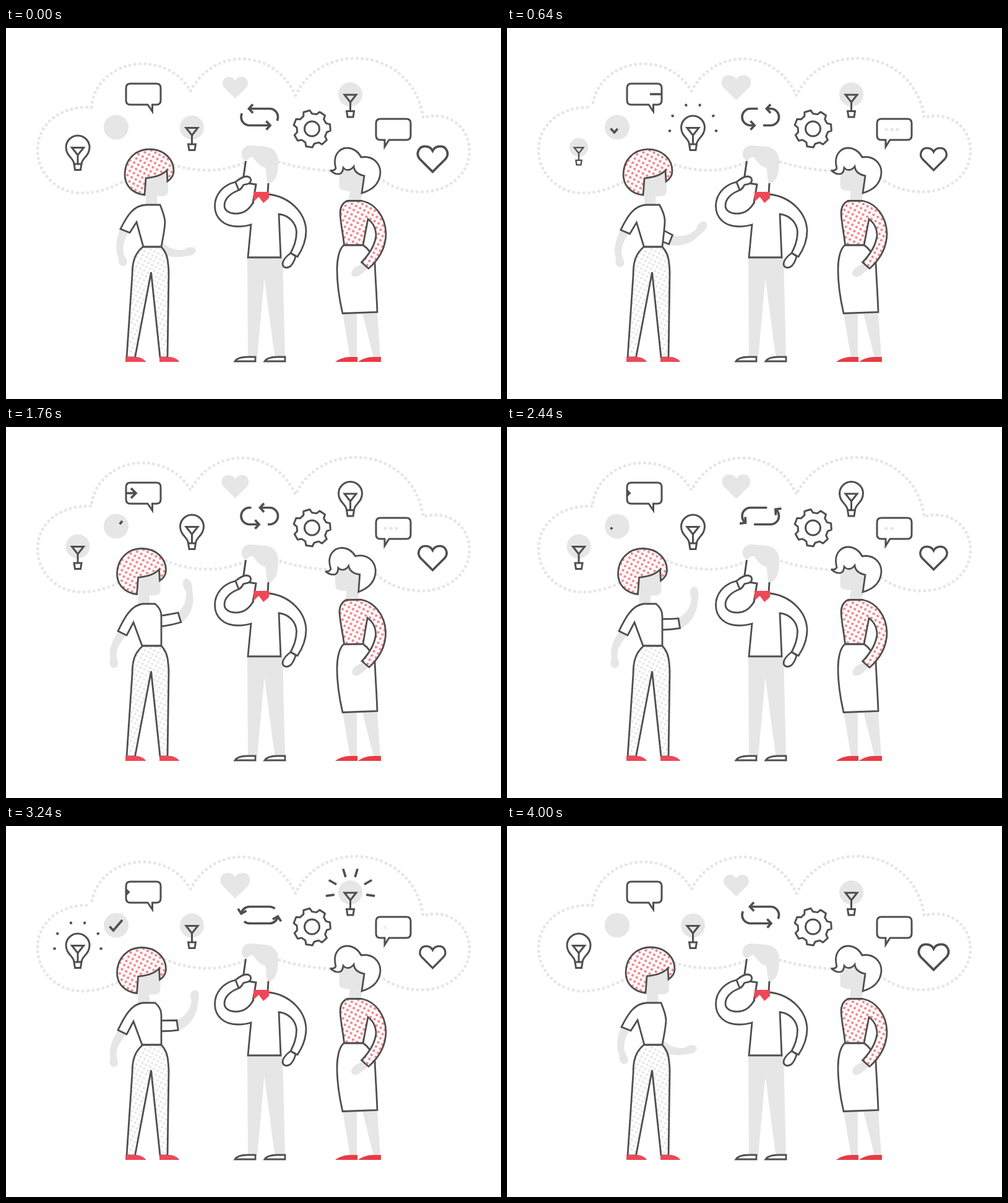
Animation, 800 px wide and 600 px high, one loop 4040 ms. Source, as an HTML page:

```html
<!DOCTYPE html>
<html lang="en">
<head>
<meta charset="utf-8">
<title>Three people sharing ideas</title>
<style>
  html, body { margin: 0; width: 100%; height: 100%; overflow: hidden; background: #fff; }
  svg { display: block; width: 800px; height: 600px; }
  .line { fill: none; stroke: #4f4f4f; stroke-width: 3; }
  .bold { stroke-width: 3.7; }
  .shape { fill: #fff; stroke: #4f4f4f; stroke-width: 2.8; }
  .soft { fill: #e6e6e6; }
  .red { fill: #ee4857; }
</style>
</head>
<body>
<svg viewBox="0 0 800 600">
  <defs>
    <pattern id="redDots" width="7.6" height="7.6" patternUnits="userSpaceOnUse" patternTransform="rotate(28)">
      <rect width="8" height="8" fill="#fff"/><circle cx="3.8" cy="3.8" r="2.2" fill="#f7868b"/>
    </pattern>
    <pattern id="softDots" width="7" height="7" patternUnits="userSpaceOnUse" patternTransform="rotate(28)">
      <rect width="8" height="8" fill="#fff"/><circle cx="3.5" cy="3.5" r="2.1" fill="#e6e6e6"/>
    </pattern>
    <clipPath id="inBubble"><rect x="194" y="90" width="57" height="34" rx="7"/></clipPath>
  </defs>

  <path id="cloud" fill="none" stroke="#e6e6e6" stroke-width="5" stroke-linecap="round" stroke-dasharray="0 8.2"
    d="M138,128C142,85 180,58 220,58C255,58 283,75 298,102C315,70 345,50 381,50C420,50 452,74 468,109C485,72 522,49 565,49C625,49 668,92 674,145C715,133 749,160 749,199C749,237 714,265 672,265C645,265 622,257 604,243L585,224C565,231 545,232 525,231C495,229 468,225 444,217L382,219C362,227 345,230 327,230C300,230 272,224 250,212C235,228 215,240 190,248C168,260 145,267 122,267C83,267 51,236 51,197C51,158 84,126 138,128"/>

  <g id="icons">
    <path class="line" d="M201,90H243q7,0 7,7V117q0,7 -7,7H236.500V135L229,124H201q-7,0 -7,-7V97q0,-7 7,-7Z"/>
    <g clip-path="url(#inBubble)"><path id="arrow" class="line bold" d="M-27,0H0M-8,-8L0,0L-8,8"/></g>

    <circle class="soft" cx="178" cy="160.500" r="20"/>
    <path id="check" class="line bold" pathLength="100" d="M167.500,162.500L173.500,169L188,152"/>

    <path id="softHeart" class="soft"/>
    <path id="lineHeart" class="line bold"/>

    <path id="loop" class="line bold" pathLength="150" stroke-dasharray="61 14"
      d="M393.500,130.500A13.500,13.500 0 0 0 393.500,157.500H426A13.500,13.500 0 0 0 426,130.500Z"/>
    <path class="line bold head" d="M-6.500,-7L0,0L-6.500,7"/>
    <path class="line bold head" d="M-6.500,-7L0,0L-6.500,7"/>

    <path id="gear" class="line" stroke-linejoin="round"/>
    <circle class="line" cx="494.500" cy="163" r="12"/>

    <path class="line" d="M605,147H647q7,0 7,7V174q0,7 -7,7H619L612,192V181H605q-7,0 -7,-7V154q0,-7 7,-7Z"/>
    <g id="typing" class="soft">
      <circle cx="613" cy="164" r="2.600"/><circle cx="622" cy="164" r="2.600"/><circle cx="631" cy="164" r="2.600"/>
    </g>
  </g>

  <g id="woman1">
    <g id="head1">
      <path class="soft" d="M226,243C240,241 252,239 260,229L262,250V262Q262,272 252,272H244L245,288H226Z"/>
      <path class="shape" style="fill:url(#redDots)" d="M224,270C205,268 192,255 192,237C192,212 210,196 232,196C255,196 271,212 271,231C271,238 267,244 261,248L260,230C250,240 238,241 226,243Z"/>
    </g>
    <path id="backArm" class="soft" d="M184,326C177,345 176,360 182,371C180,380 185,385 190,385C196,384 198,377 193,371C187,360 188,348 199,328Z"/>
    <path id="foreArm" class="soft" d="M-1,-8C14,-12 24,-22 27.500,-36C25,-45 29,-53 35,-53C42,-51 42,-42 37.500,-32C33,-12 20,5 -1,9Z"/>
    <path id="sleeve" class="shape" d="M-45,-14Q-20,-10 0,-8V8Q-20,8 -45,3Z"/>
    <path id="torso1" class="shape"/>
    <path class="shape" style="fill:url(#softDots)" d="M221,354C208,365 204,378 204,400L195,533H208.500L234.500,395L249,533H261L263,395C262,375 261,365 251,354Z"/>
    <path class="red" d="M193,532H212C219,533 225,537 226,540H193ZM248,532H266C273,533 279,537 280,540H248Z"/>
  </g>

  <g id="man">
    <path fill="#fff" d="M388,210L382,266H424V212Z"/>
    <path class="soft" d="M381,207C379,195 388,189 397,190L420,192C434,194 440,204 440,215C440,236 436,250 423,252C420,242 421,234 419,226C408,224 402,212 399,209C394,207 390,214 387,214C384,213 382,210 381,207Z"/>
    <path class="soft" d="M390,371H447L451,533H434.500L417.500,405L406,533H391Z"/>
    <path class="line" d="M387.500,215L383.500,243M424,251L423,267"/>
    <path class="shape" d="M371,249C350,254 337.500,270 337.500,288C337.500,308 353,321 374,321C382,321 390,320 396,318L391,371H444L441,301C458,303 469,316 469.500,330C469.500,344 465,354 460,364L471,370C479,358 485,345 485,328C484,298 458,273 425,269L402,268L399,283C393,293 386,299 375,300C362,301 353,296 353,287C353,276 363,267 377,262Z"/>
    <path class="line" d="M391,251L404,253L399,284"/>
    <path class="shape" d="M371,249C377,244 383,240 389,240C397,241 398,249 391,252C387,254 384,252 383,255C381,259 379,261 376,262Z"/>
    <path class="shape" d="M460,364C452,370 447,376 447,382C448,389 456,389 461,384C465,379 467,374 468,369Z"/>
    <path class="red" d="M400,265H425V275L416,283L408.500,273L400,281Z"/>
    <path class="shape" d="M370,539C374,533 383,532 390,532H403V539ZM418,539C422,533 431,532 438,532H451V539Z"/>
  </g>

  <g id="woman2">
    <path class="soft" d="M544,461H567V533H556ZM576,461H600L605,533H594Z"/>
    <path class="red" style="fill:#e93b43" d="M532,540C538,535 548,532 556,532H568V540ZM569,540C575,535 585,532 593,532H606V540Z"/>
    <path class="shape" d="M546,351C538,358 535,375 535,390C535,415 539,440 544,461.500L600,459.500C599,430 597,405 596,378C592,367 586,357 577,351Z"/>
    <g id="head2">
      <path class="soft" d="M541,231L538.500,240V256C539,262 546,263 556,264L553,280H573L577,262L580,236C570,238 560,234 561,224Q552,231 541,231Z"/>
      <path class="shape" d="M524,230Q530,232 533,227C527,205 540,194 551,194C562,194 570,201 574,209C592,206 605,218 605,234C604,252 592,262 575,267L579,239C569,237 563,233 562,224C557,231 549,231 545,226Q544,235 539,236C533,237 528,234 524,230Z"/>
    </g>
    <g id="top2">
      <path class="soft" d="M575,382C565,385 559,390 558,397C559,404 568,404 574,398L585,389Z"/>
      <path class="shape" style="fill:url(#redDots)" d="M551,279.500C542,284 540,293 540,300C541,318 545,335 546.500,351H577L585,309C593,315 598,325 598,336C596,352 588,365 574.500,379L586,389C603,374 614,354 614,332C613,305 597,284 575,279.500Z"/>
    </g>
  </g>
</svg>
<script>
const LOOP = 4040, CYCLE = 4000, STEP = 40;
const $ = id => document.getElementById(id);
const set = (el, attrs) => { for (const k in attrs) el.setAttribute(k, attrs[k]); };
const clamp = x => Math.max(0, Math.min(1, x));
const smooth = x => x * x * (3 - 2 * x);
const linear = x => x;

// Rows are [position, ...values] in rising order.
function at(rows, x, ease = smooth) {
  let i = 0;
  while (i < rows.length - 2 && x > rows[i + 1][0]) i++;
  const a = rows[i], b = rows[i + 1];
  const p = ease(clamp((x - a[0]) / (b[0] - a[0])));
  return a.slice(1).map((v, j) => v + (b[j + 1] - v) * p);
}

// Blends two paths that share the same commands.
function blend(from, to, p) {
  const end = to.match(/-?[\d.]+/g);
  let i = 0;
  return from.replace(/-?[\d.]+/g, n => +n + (end[i++] - n) * p);
}

const TORSO = [
  'M226,286L249,286C253,296 257,305 257,315C256,330 253,342 251,354L222,354L211,314L200,331L185,325C196,303 206,287 226,286Z',
  'M221,286L241,286C247,291 251,297 251,306C251,320 251,338 251,354L220,354L206,316L195,337L181,330C191,309 202,288 221,286Z'
];
const LEAN = [[280, 0], [1240, 1], [3400, 1], [3960, 0]];
const BACK_ARM = [[160, 0], [1140, 1], [3360, 1], [3940, 0]];
const WAVE = [[60, 66], [1160, -1], [1300, -1], [1780, -25], [2200, -3], [2760, -25], [3280, -7], [3980, 66]];
// forearm turn -> cuff x, cuff y, sleeve turn
const CUFF = [[-25, 280.5, 308, -17], [-12.5, 278.5, 316.5, -10], [-7, 277, 322.5, -7.6],
  [0, 275.5, 325, -3.5], [28, 265.5, 342, 20], [66, 244, 348, 50]];
const NOD = [[1400, 0], [1740, 1], [1940, 1], [2320, 0]];

const HEART = 'M0,20L-20,0C-27,-8 -22,-20 -12,-20C-6,-20 -2,-17 0,-13C2,-17 6,-20 12,-20C22,-20 27,-8 20,0Z';
set($('softHeart'), { d: HEART });
set($('lineHeart'), { d: HEART });

const polar = (r, deg) => {
  const a = deg * Math.PI / 180;
  return (r * Math.sin(a)).toFixed(2) + ',' + (-r * Math.cos(a)).toFixed(2);
};

const TEETH = 7;
let rim = '';
for (let i = 0; i < TEETH; i++) {
  [[-17, 24.5], [-10, 30], [10, 30], [17, 24.5]].forEach(([da, r]) => {
    rim += (rim ? 'L' : 'M') + polar(r, i * 360 / TEETH - 17 + da);
  });
}
set($('gear'), { d: rim + 'Z', transform: 'translate(494.5 163)' });

// Each bulb is outlined from "on" to "off", around the loop.
const bulbs = [
  { x: 116, y: 193, on: 2820, off: 600 },
  { x: 300.5, y: 161, on: 220, off: 2600 },
  { x: 556.5, y: 107.5, on: 800, off: 2960 }
];
for (const b of bulbs) {
  const g = document.createElementNS('http://www.w3.org/2000/svg', 'g');
  g.innerHTML = `<g><circle class="soft" r="19.5"/>
    <path class="line" d="M-6,27C-6,18 -19,14 -19,0A19,19 0 0 1 19,0C19,14 6,18 6,27"/>
    <path class="line" d="M-9.5,0.5H9.5L0,12.5ZM0,12.5V27M-6,27H6L4.5,36.5H-4.5Z"/></g><path class="line bold"/>`;
  set(g, { transform: `translate(${b.x} ${b.y})` });
  $('icons').append(g);
  b.body = g.children[0];
  b.rays = g.children[1];
  [b.glow, b.glass] = b.body.children;
}

function drawBulb(b, t) {
  const lit = b.on < b.off ? t >= b.on && t < b.off : t >= b.on || t < b.off;
  const past = [b.on, b.off].filter(s => s <= t);
  const since = past.length ? t - Math.max(...past) : CYCLE;
  set(b.glow, { visibility: lit ? 'hidden' : 'visible' });
  set(b.glass, { visibility: lit ? 'visible' : 'hidden' });
  set(b.body, { transform: `scale(${0.7 + 0.3 * clamp(since / 160)})` });
  const p = (since - 80) / 400;
  let d = '';
  if (p > 0 && p < 1) {
    const inner = 26 + 28 * clamp(p - 0.5), outer = 26 + 28 * Math.min(p, 0.5);
    for (const a of [-98, -60, -17, 17, 60, 98]) d += `M${polar(inner, a)}L${polar(outer, a)}`;
  }
  set(b.rays, { d });
}

const loop = $('loop'), heads = document.querySelectorAll('.head');
const loopLength = loop.getTotalLength();
const onLoop = s => loop.getPointAtLength((s + 150) % 150 / 150 * loopLength);

function drawLoop(t) {
  const tip = 1 + 0.075 * t;
  set(loop, { 'stroke-dashoffset': 61 - tip % 75 });
  heads.forEach((head, i) => {
    const s = tip + i * 75, p = onLoop(s), q = onLoop(s - 2);
    const turn = Math.atan2(p.y - q.y, p.x - q.x) * 180 / Math.PI;
    set(head, { transform: `translate(${p.x} ${p.y}) rotate(${turn})` });
  });
}

function drawIcons(t) {
  const sway = (1 - Math.cos(2 * Math.PI * t / CYCLE)) / 2;
  set($('cloud'), { 'stroke-dashoffset': 2.5 * sway });

  set($('arrow'), { transform: `translate(${194 + 0.1 * (t % 800)} 107)`, visibility: t % 800 ? 'visible' : 'hidden' });

  const c = t % 2000;
  const drawn = 100 * clamp((c - 380) / 480), wiped = 100 * clamp((c - 1380) / 480);
  set($('check'), {
    'stroke-dasharray': `${drawn - wiped} 300`,
    'stroke-dashoffset': -wiped,
    visibility: drawn > wiped ? 'visible' : 'hidden'
  });

  const beat = Math.sin(Math.PI * c / 2000);
  set($('softHeart'), { transform: `translate(370.5 96.5) scale(${(40.5 + 7.5 * beat) / 46})` });
  set($('lineHeart'), { transform: `translate(689.5 212) scale(${(47.5 - 7.5 * beat) / 46})` });

  [...$('typing').children].forEach((dot, i) => {
    set(dot, { opacity: clamp((t % 1000 - 180 * (i + 1)) / 80) });
  });

  drawLoop(t);
  bulbs.forEach(b => drawBulb(b, t));
}

function drawPeople(t) {
  const [lean] = at(LEAN, t), [swing] = at(BACK_ARM, t), [turn] = at(WAVE, t), [nod] = at(NOD, t);
  const [x, y, sleeve] = at(CUFF, turn, linear);
  set($('head1'), { transform: `translate(${-12.5 * lean} ${0.5 * lean})` });
  set($('torso1'), { d: blend(TORSO[0], TORSO[1], lean) });
  set($('backArm'), { transform: `translate(${-4 * lean} ${6.5 * lean}) rotate(${13 * swing} 192 330)` });
  set($('foreArm'), { transform: `translate(${x} ${y}) rotate(${turn})` });
  set($('sleeve'), { transform: `translate(${x} ${y}) rotate(${sleeve})` });
  set($('head2'), { transform: `translate(${-4 * nod} ${0.5 * nod}) rotate(${-4 * nod} 563 285)` });
  set($('top2'), { transform: `rotate(${-1.2 * nod} 562 351)` });
}

function frame() {
  const t = Math.floor(performance.now() % LOOP / STEP) * STEP % CYCLE;
  drawIcons(t);
  drawPeople(t);
  requestAnimationFrame(frame);
}
frame();
</script>
</body>
</html>
```
